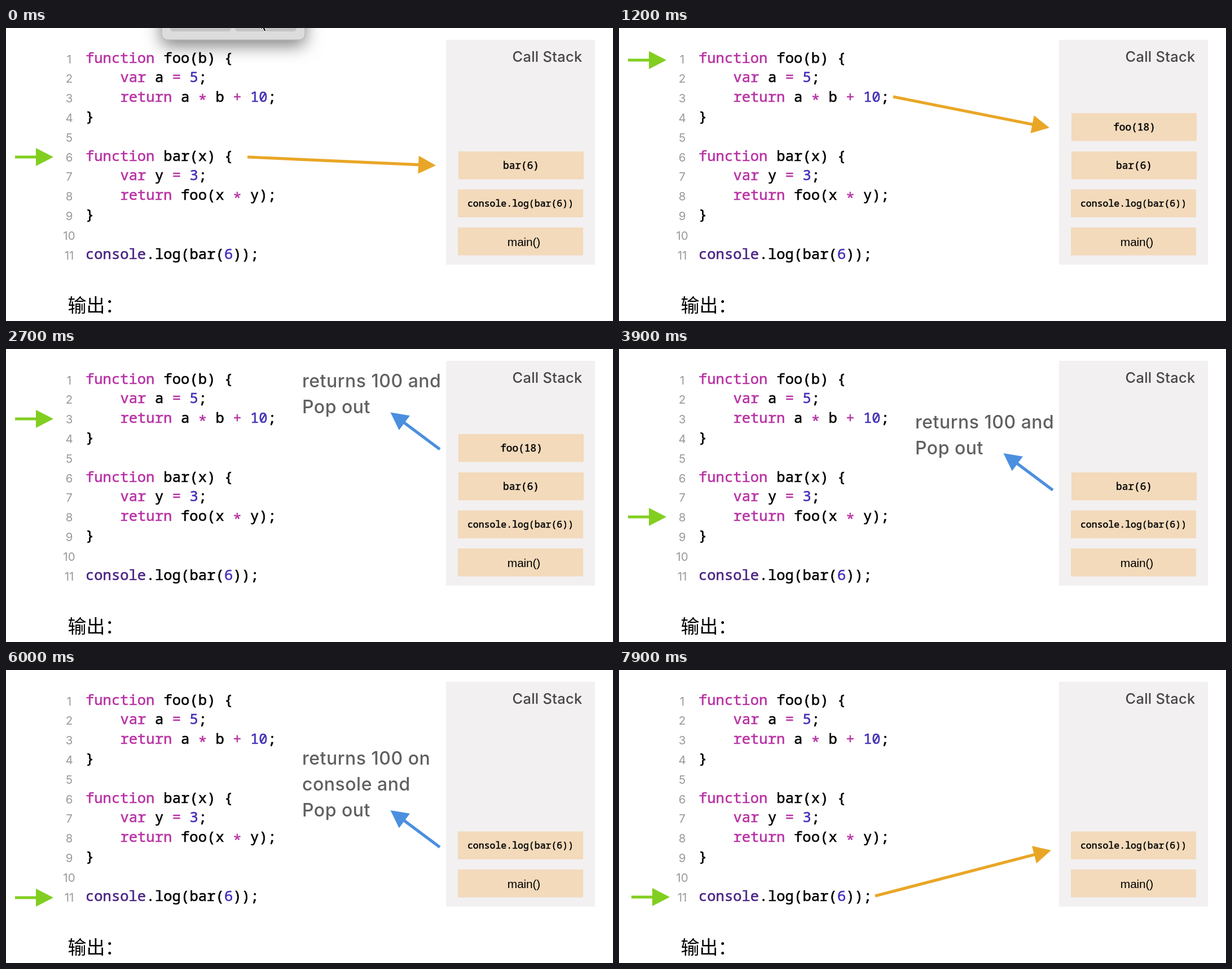
Write an HTML page that moves like this. It is 1076 px wide and 520 px high and loops after 8000 ms.

```html
<!DOCTYPE html>
<html lang="zh-CN">
<head>
<meta charset="utf-8">
<title>Call Stack</title>
<style>
  html, body { margin: 0; width: 100%; height: 100%; overflow: hidden; background: #fff; }
  svg { display: block; width: 1076px; height: 520px; }
  .code { font: 400 25.5px "Noto Sans Mono", "DejaVu Sans Mono", monospace; stroke-width: .6px; }
  .num { font: 400 20.5px Inter, sans-serif; fill: #999; text-anchor: middle; }
  .title { font: 500 25.5px Inter, sans-serif; fill: #484648; letter-spacing: .25px; }
  .call { font: 400 17.8px "Noto Sans Mono", "DejaVu Sans Mono", monospace; text-anchor: middle;
    stroke: #000; stroke-width: .5px; }
  .log { font-size: 16.5px; }
  .main { font: 400 21px "Liberation Sans", Arial, sans-serif; letter-spacing: -.2px; text-anchor: middle; }
  .note { font: 500 32px Inter, sans-serif; fill: #606060; letter-spacing: .5px; }
  .out { font: 400 33px "Noto Sans CJK SC", "Noto Sans CJK", sans-serif; }
  .result { font: 400 32px Inter, sans-serif; }
</style>
</head>
<body>
<svg id="stage" viewBox="0 0 1076 520" xmlns="http://www.w3.org/2000/svg">
  <defs>
    <filter id="shadow" x="-30%" y="-50%" width="160%" height="300%">
      <feDropShadow dx="0" dy="10" stdDeviation="15" flood-color="#000" flood-opacity=".5"/>
    </filter>
  </defs>
</svg>
<script>
const LOOP = 8000;
const GREEN = '#82ce20', ORANGE = '#e9a626', BLUE = '#4b8fdf';
const stage = document.getElementById('stage');

function add(parent, tag, attrs, content) {
  const el = document.createElementNS('http://www.w3.org/2000/svg', tag);
  for (const key in attrs) el.setAttribute(key, attrs[key]);
  if (content) el.textContent = content;
  parent.appendChild(el);
  return el;
}

const rect = (parent, x, y, width, height, fill, rx = 0) =>
  add(parent, 'rect', { x, y, width, height, fill, rx });

const label = (parent, cls, x, y, content, color) =>
  add(parent, 'text', { class: cls, x, y, ...(color && { fill: color, stroke: color }) }, content);

function arrow(parent, color, x1, y1, x2, y2, head = 32, half = 16) {
  const len = Math.hypot(x2 - x1, y2 - y1);
  const angle = Math.atan2(y2 - y1, x2 - x1) * 180 / Math.PI;
  add(parent, 'path', {
    transform: `translate(${x1} ${y1}) rotate(${angle})`, fill: color,
    d: `M0-2.6H${len - head + 1}V-${half}L${len} 0L${len - head + 1} ${half}V2.6H0Z`
  });
}

// Code listing
const source = `function foo(b) {
    var a = 5;
    return a * b + 10;
}

function bar(x) {
    var y = 3;
    return foo(x * y);
}

console.log(bar(6));`;
const token = /(function|var|return|[*+=])|(\d+)|(console)|[a-z]+|[^\s\w*+=]+/g;

source.split('\n').forEach((line, i) => {
  const y = 61.5 + i * 34.8;
  label(stage, 'num', 112, y + 1, String(i + 1));
  for (const m of line.matchAll(token)) {
    const color = m[1] ? '#b832a4' : m[2] ? '#4230b6' : m[3] ? '#4b2382' : '#000';
    label(stage, 'code', 141 + m.index * 15.37, m[0] === '*' ? y + 4.5 : y, m[0], color);
  }
});
label(stage, 'out', 109.5, 504, '输出：');

// Stack panel
rect(stage, 780, 21, 264, 399, '#f2f0f1');
label(stage, 'title', 897.5, 60, 'Call Stack');

const calls = [
  { x: 801, y: 354, text: 'main()', cls: 'main', base: 387, cx: 918 },
  { x: 801, y: 286.5, text: 'console.log(bar(6))', cls: 'call log', base: 316.5, cx: 912 },
  { x: 802, y: 219, text: 'bar(6)', cls: 'call', base: 250, cx: 913 },
  { x: 802, y: 151, text: 'foo(18)', cls: 'call', base: 182, cx: 913.5 }
];
const frames = calls.map(c => {
  const g = add(stage, 'g', {});
  rect(g, c.x, c.y, 222, 49.5, '#f3dabb');
  label(g, c.cls, c.cx, c.base, c.text);
  return g;
});

// Each scene: start time, stack depth, line pointer, push arrow or pop note
const scenes = [
  { at: 0, depth: 3, ptr: [16, 229], push: [428, 229, 762, 244] },
  { at: 600, depth: 4, ptr: [16, 57], push: [486, 122, 763, 177] },
  { at: 2000, depth: 4, ptr: [16, 124], tip: 113, base: 68, note: ['returns 100 and', 'Pop out'] },
  { at: 3400, depth: 3, ptr: [16, 298], tip: 185.5, base: 141, note: ['returns 100 and', 'Pop out'] },
  { at: 4800, depth: 2, ptr: [16, 404], tip: 249.5, base: 168, note: ['returns 100 on', 'console and', 'Pop out'] },
  { at: 6200, depth: 1, tip: 314, base: 198.5, note: ['script finish,', 'main pops out,', 'stack empty'], result: '100' },
  { at: 7600, depth: 2, ptr: [22, 403], push: [454, 401, 766, 320] }
];
for (const s of scenes) {
  s.group = add(stage, 'g', {});
  if (s.ptr) arrow(s.group, GREEN, s.ptr[0], s.ptr[1], s.ptr[0] + 68, s.ptr[1]);
  if (s.push) arrow(s.group, ORANGE, ...s.push);
  if (s.note) {
    s.note.forEach((text, i) => label(s.group, 'note', 525, s.base + i * 45.8, text));
    arrow(s.group, BLUE, 769, s.tip + 65, 681.5, s.tip - .5);
  }
  if (s.result) label(s.group, 'result', 207, 503.5, s.result);
}

// Dialog leaving the top edge
const dialog = add(stage, 'g', {});
add(dialog, 'rect', {
  x: 276, y: -60, width: 254, height: 81, rx: 10,
  fill: '#dddcdd', stroke: '#aaa', 'stroke-width': 1, filter: 'url(#shadow)'
});
rect(dialog, 291, -20, 108, 26, '#c4c3c4', 5);
rect(dialog, 406, -20, 109, 26, '#c4c3c4', 5);
add(dialog, 'path', { d: 'M452-9V3L455 0L458 6L461 5L458-1H462Z', fill: '#000', stroke: '#fff' });

function draw() {
  const t = performance.now() % LOOP;
  const now = scenes.filter(s => s.at <= t).pop();
  for (const s of scenes) s.group.style.display = s === now ? '' : 'none';
  frames.forEach((f, i) => { f.style.display = i < now.depth ? '' : 'none'; });
  dialog.style.opacity = Math.max(0, Math.min(1, (300 - t) / 200));
  requestAnimationFrame(draw);
}
draw();
</script>
</body>
</html>
```
